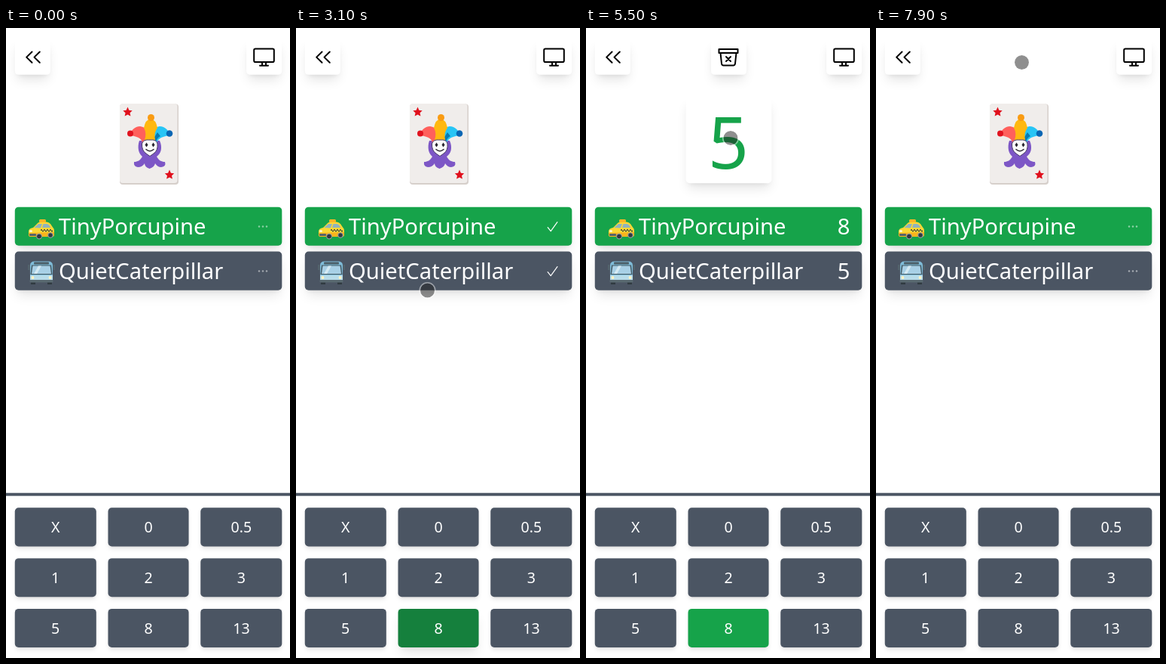
An HTML page for the animation above (8 s loop, 377 by 833 pixels).

```html
<!DOCTYPE html>
<html lang="en">
<head>
<meta charset="utf-8">
<title>Planning poker</title>
<style>
html, body { margin: 0; width: 377px; height: 833px; overflow: hidden; background: #fff; }
body { position: relative; font-family: "Noto Sans", sans-serif; }
#boxes { position: absolute; left: 0; top: 0; width: 385px; transform: scale(.982); transform-origin: 0 0; }
.box { position: absolute; border-radius: 5px; }
.md { box-shadow: 0 4px 6px -1px #0000001a, 0 2px 4px -2px #0000001a; }
.lg { box-shadow: 0 10px 15px -3px #0000001a, 0 4px 6px -4px #0000001a; }
svg { position: absolute; left: 0; top: 0; }
.icon { fill: none; stroke: #000; stroke-width: 2; stroke-linecap: round; stroke-linejoin: round; }
.label { fill: #fff; font-size: 29.2px; }
.key { fill: #fff; font-size: 19.6px; text-anchor: middle; }
.check { fill: none; stroke: #fff; stroke-width: 1.2; stroke-linecap: round; stroke-linejoin: round; }
</style>
</head>
<body>
<div id="boxes"></div>
<svg id="stage" width="377" height="833">
  <path class="icon" stroke-width="2.200" d="M34.500 31.500L27.200 38.600l7.300 7.100M44.800 31.500L37.500 38.600l7.300 7.100"/>
  <path class="icon" d="M331 27.500h23q1.800 0 1.800 1.800v14q0 1.800-1.800 1.800h-23q-1.800 0-1.800-1.800v-14q0-1.800 1.800-1.800zM337 49.800h11M340 45.500v4M345 45.500v4"/>

  <g id="joker">
    <rect x="151" y="100.500" width="78" height="106.500" rx="4" fill="#d6cfcb"/>
    <rect x="151" y="100" width="76.500" height="105" rx="4" fill="#f0edeb"/>
    <path id="star" fill="#e0101d" d="M161.500 104.500l1.900 4.200 4.300.5-3.200 3 .9 4.400-3.900-2.200-3.900 2.200.9-4.400-3.200-3 4.300-.5z"/>
    <use href="#star" x="55.500" y="83"/>
    <path fill="#7d57c6" d="M177 149C174 158 176 166 181 170C178 175 175 177 170 177Q169 183 175 184Q181 184 184 179Q184 184 190.500 186Q197 184 198 179Q201 184 206 184Q213 183 211 177C206 177 203 175 200 170C206 166 208 158 204 149Z"/>
    <path fill="#ff605c" d="M181 153C181 147 177 144 165 142C165 136 171 130 178 130C187 131 189 138 190 149Z"/>
    <path fill="#27c5f5" d="M200 153C201 147 205 144 217 142C217 136 211 130 204 130C195 131 193 138 191 149Z"/>
    <path fill="#087bb3" d="M199 153Q199 146 205 143L201 138L194 149Z"/>
    <path fill="#ffb810" d="M184 148Q187 139 183 132Q185 121 192 120Q199 121 201 132Q196 139 198 148Z"/>
    <circle cx="165" cy="139.500" r="4" fill="#e1131f"/>
    <circle cx="192.500" cy="118.500" r="4.500" fill="#f99b12"/>
    <circle cx="217" cy="139.500" r="4.300" fill="#0866b4"/>
    <path fill="#fafafa" stroke="#493d65" d="M180.500 153Q182 147 191 148Q200 147 201 153Q202 162 196 166L191 169.500L186 166Q180 162 180.500 153Z"/>
    <path fill="#292630" d="M186.500 151.500l2 3-2 3-2-3zM195.500 151.500l2 3-2 3-2-3z"/>
    <path fill="none" stroke="#292630" stroke-width="1.500" stroke-linecap="round" d="M186 160.500Q191 165 196 160.500"/>
  </g>

  <g id="result">
    <path class="icon" d="M176.500 28h25v5h-25zM178.500 33l1.500 14q.3 2.500 2.500 2.500h13q2.200 0 2.500-2.500l1.500-14M186 38l6 6M192 38l-6 6"/>
    <text x="189" y="186" font-size="94.300" text-anchor="middle" fill="#16a34a">5</text>
  </g>

  <g id="taxi">
    <path fill="#fdd835" d="M30 269Q30 265 36 264L42 258Q43 256.500 46 256.500H54Q57 256.500 59 259L62 263.500Q64 265 64 268V273Q64 276 61 276H33Q30 276 30 273Z"/>
    <path fill="#f9b31e" d="M30 271L64 270V273Q64 276 61 276H33Q30 276 30 273Z"/>
    <path fill="#8fb3bd" d="M37.500 264L43 259H48L46 264.500ZM49.500 259H54Q56 259 57 260.500L59.500 264H48Z"/>
    <rect x="44" y="253" width="9" height="4" rx="1.500" fill="#ffb526"/>
    <path stroke="#303a40" stroke-width="1.500" stroke-dasharray="2 2" d="M46 267H62M48 268.500H62"/>
    <ellipse cx="33" cy="268.500" rx="2" ry="1.600" fill="#fff8d5"/>
    <rect x="31" y="272" width="9" height="3" rx="1" fill="#59646a"/>
    <g fill="#303a40" stroke="#9aa7ae"><circle cx="44" cy="275.500" r="3.500"/><circle cx="59" cy="274" r="3.300"/></g>
  </g>

  <g id="bus">
    <path fill="#303a40" d="M33 333h6v6h-6zM55 333h6v6h-6z"/>
    <path fill="#7fbcd9" d="M32 314Q32 308.500 38 308.500H56Q62 308.500 62 314V335H32Z"/>
    <rect x="37" y="309.500" width="20" height="3" rx="1" fill="#4c5f69"/>
    <path fill="#455a64" d="M34 313.500H60L61.500 326H32.500Z"/>
    <path fill="#a8d0e6" d="M35.500 314.500H58.500L60 325H34Z"/>
    <path fill="#d5eaf4" d="M37 325L43 314.500H47L41 325Z"/>
    <path fill="#b8dcea" d="M32 327H62V333H32Z"/>
    <rect x="31.500" y="333" width="31" height="3.500" rx="1" fill="#596970"/>
    <path fill="#53636c" d="M29 313h2.500v7h-2.500zM62.500 313h2.500v7h-2.500z"/>
    <g fill="#fff3c0"><circle cx="35.500" cy="330" r="1.900"/><circle cx="58.500" cy="330" r="1.900"/></g>
  </g>
</svg>
<script>
const SLATE = [75, 85, 99], GREEN = [22, 163, 74], DARK_GREEN = [21, 128, 61];
const SCALE = .982;
const stage = document.getElementById('stage');
const boxes = document.getElementById('boxes');
const joker = document.getElementById('joker');
const result = document.getElementById('result');
const rgb = c => `rgb(${c.map(Math.round)})`;
const mix = (a, b, k) => a.map((v, i) => v + (b[i] - v) * k);
const show = (el, on) => { el.style.display = on ? '' : 'none'; };

// Boxes use unscaled layout pixels
function addBox(x, y, w, h, color, shadow) {
  const el = document.createElement('div');
  el.className = 'box ' + shadow;
  el.style.cssText = `left:${x}px;top:${y}px;width:${w}px;height:${h}px;background:${color}`;
  boxes.append(el);
  return el;
}

function addSvg(tag, attrs, text = '') {
  const el = document.createElementNS('http://www.w3.org/2000/svg', tag);
  for (const name in attrs) el.setAttribute(name, attrs[name]);
  el.textContent = text;
  stage.append(el);
  return el;
}

addBox(12, 15, 48, 48, '#fff', 'lg');
addBox(325, 15, 48, 48, '#fff', 'lg');
const resultBoxes = [addBox(168.5, 15, 48, 48, '#fff', 'lg'), addBox(134.5, 93, 116, 116, '#fff', 'lg')];
addBox(0, 626, 385, 4, rgb(SLATE), '').style.borderRadius = 0;

function addPlayer(name, top, color, vote, votedAt) {
  const y = top * SCALE;
  addBox(12, top, 361, 52, rgb(color), 'lg');
  addSvg('text', { class: 'label', x: 70, y: y + 36.5 }, name);
  const dots = addSvg('g', { fill: '#fff' });
  for (const cx of [336, 341, 346]) dots.append(addSvg('circle', { cx, cy: y + 25.8, r: 1.2 }));
  return {
    votedAt, dots,
    check: addSvg('path', { class: 'check', d: `M334.200 ${y + 27}l4 5 8.700-12` }),
    vote: addSvg('text', { class: 'label', x: 350.5, y: y + 36.5, 'text-anchor': 'end' }, vote)
  };
}

const players = [
  addPlayer('TinyPorcupine', 241, GREEN, 8, 2300),
  addPlayer('QuietCaterpillar', 301, SLATE, 5, 500)
];

const keyWidth = (361 - 2 * 16) / 3;
const keys = ['X', '0', '0.5', '1', '2', '3', '5', '8', '13'].map((label, i) => {
  const x = 12 + i % 3 * (keyWidth + 16), y = 646 + Math.floor(i / 3) * 68;
  addSvg('text', { class: 'key', x: (x + keyWidth / 2) * SCALE, y: y * SCALE + 32.7 }, label);
  return addBox(x, y, keyWidth, 52, rgb(SLATE), 'md');
});
const picked = keys[7];

const cursor = addSvg('g', {});
for (const attrs of [
  { r: 9.5, fill: '#202020', 'fill-opacity': .5 },
  { r: 10.3, fill: 'none', stroke: '#fff', 'stroke-opacity': .45, 'stroke-width': 1.6 }
]) cursor.append(addSvg('circle', attrs));

// Time, x, y
const path = [
  [1500, 135.5, 827], [1700, 166, 804], [1900, 187, 796], [2600, 189, 795],
  [2800, 186, 690], [3100, 174.5, 347], [3300, 175, 222], [3500, 178, 173],
  [3800, 190.5, 141.5], [3900, 190.5, 141.5], [4100, 193, 159], [4300, 191.5, 155],
  [5400, 191.5, 155], [5500, 192, 145.5], [5800, 192.5, 96], [6200, 192.5, 45.5],
  [7800, 192.5, 45.5], [7900, 193.5, 45.5]
];

function cursorAt(t) {
  const i = path.findIndex(p => p[0] > t);
  if (i < 0) return path[path.length - 1];
  const a = path[i - 1], b = path[i];
  return mix(a, b, (t - a[0]) / (b[0] - a[0]));
}

function pickedColor(t) {
  if (t < 2300 || t >= 6900) return SLATE;
  if (t < 2400) return mix(SLATE, DARK_GREEN, .6);
  if (t < 4600) return DARK_GREEN;
  if (t < 4700) return mix(DARK_GREEN, GREEN, .6);
  return t < 6800 ? GREEN : mix(GREEN, SLATE, .62);
}

function draw() {
  const t = Math.floor(performance.now() % 8000 / 100) * 100;
  const revealed = t >= 4600 && t < 6800;
  const pulse = .75 + .25 * Math.cos((t - (t < 4600 ? 1000 : 6750)) / 1000 * Math.PI);

  show(joker, !revealed);
  for (const el of [result, ...resultBoxes]) show(el, revealed);
  for (const p of players) {
    const waiting = t < p.votedAt || t >= 6800;
    show(p.dots, waiting);
    p.dots.style.opacity = pulse;
    show(p.check, !waiting && !revealed);
    show(p.vote, revealed);
  }
  picked.style.background = rgb(pickedColor(t));
  picked.className = 'box ' + (t >= 2300 && t < 4600 ? 'lg' : 'md');

  show(cursor, t >= 1500);
  if (t >= 1500) {
    const [, x, y] = cursorAt(t);
    cursor.setAttribute('transform', `translate(${x} ${y})`);
  }
  requestAnimationFrame(draw);
}
draw();
</script>
</body>
</html>
```
